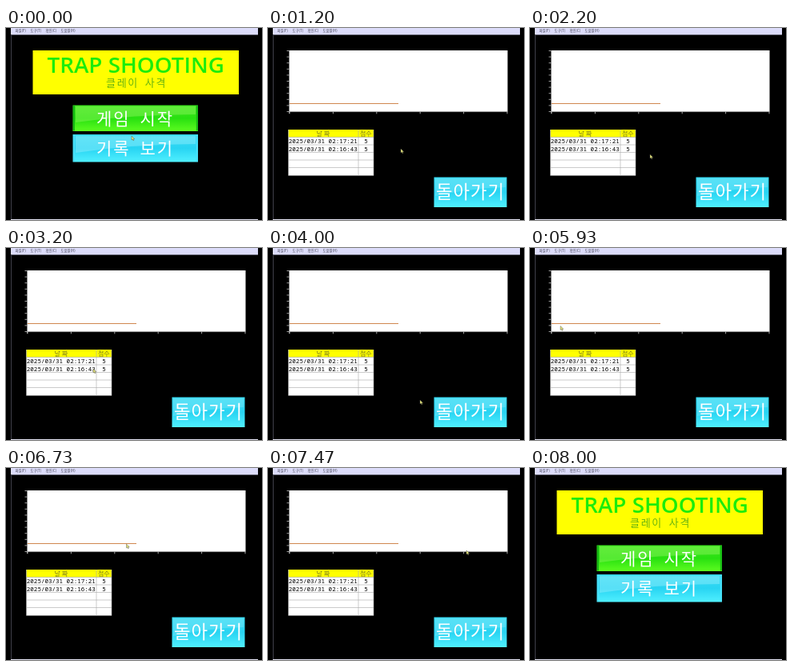
Animation, 320 px wide and 240 px high, one loop 8070 ms. Source, as an HTML page:

```html
<!DOCTYPE html>
<html lang="ko">
<head>
<meta charset="utf-8">
<title>Trap Shooting</title>
<style>
  html, body { margin: 0; width: 100%; height: 100%; overflow: hidden; background: #000; }
  svg { display: block; width: 100vw; height: 100vh; }
  text { font-family: "Noto Sans CJK KR", "Noto Sans CJK", sans-serif; }
  .bar { font-size: 4.4px; fill: #404050; }
  .title { font: 600 27.8px "Open Sans", sans-serif; fill: #1cec0c; }
  .sub { font-size: 13px; font-weight: 300; letter-spacing: 1.7px; word-spacing: 2.4px; fill: #68b410; }
  .label { font-size: 21px; font-weight: 300; letter-spacing: 1.9px; word-spacing: 4.2px; fill: #fff; }
  .back { font-size: 22.4px; font-weight: 300; letter-spacing: .9px; fill: #fff; }
  .head { font-size: 8px; font-weight: 300; fill: #78781c; }
  .cell { font: 7.55px "Noto Sans Mono", monospace; fill: #000; }
</style>
</head>
<body>
<svg viewBox="0 0 320 240" preserveAspectRatio="none">
  <defs>
    <linearGradient id="green" x2="0" y2="1">
      <stop offset="0" stop-color="#40e420"/>
      <stop offset=".5" stop-color="#28e010"/>
      <stop offset="1" stop-color="#5cfc20"/>
    </linearGradient>
    <linearGradient id="blue" x2="0" y2="1">
      <stop offset="0" stop-color="#3cdcf4"/>
      <stop offset=".5" stop-color="#28d4f2"/>
      <stop offset="1" stop-color="#50f0ff"/>
    </linearGradient>
  </defs>

  <rect width="320" height="240"/>
  <rect x="6" width="309" height="8.5" fill="#dcdcfa"/>
  <path d="M6.5 8V240" stroke="#50505e" stroke-width=".8"/>
  <path d="M6 239.5H315" stroke="#e4e4f4"/>
  <g class="bar">
    <text x="11.5" y="5.2">파일(F)</text>
    <text x="30.5" y="5.2">도구(T)</text>
    <text x="49.5" y="5.2">확인(C)</text>
    <text x="68.5" y="5.2">도움말(H)</text>
  </g>

  <g id="menu">
    <rect x="33.5" y="28" width="257.5" height="55" fill="#ffff00"/>
    <text class="title" x="51.5" y="56">TRAP SHOOTING</text>
    <text class="sub" x="125" y="73">클레이 사격</text>

    <rect x="83.5" y="96.5" width="156.5" height="32.5" fill="url(#green)"/>
    <path d="M87 98H237V108Q160 108 87 118Z" fill="#98f868" opacity=".4"/>
    <path d="M85 97V128.5M238.8 97V128.5" stroke="#14b814" stroke-width="2"/>
    <text class="label" x="113" y="120.5">게임 시작</text>

    <rect x="83.5" y="133" width="156.5" height="34.5" fill="url(#blue)"/>
    <path d="M87 135H237V145Q160 145 87 156Z" fill="#a0f0fc" opacity=".4"/>
    <path d="M85 133.5V167M238.8 133.5V167" stroke="#48e0f8" stroke-width="2"/>
    <text class="label" x="113" y="158">기록 보기</text>
  </g>

  <g id="records">
    <rect x="27" y="28" width="272.5" height="76.5" fill="#fff"/>
    <path d="M26.5 28V107" stroke="#999" stroke-width=".9"/>
    <path d="M27 104.6H299.5" stroke="#bbb" stroke-width=".7"/>
    <path id="ticks" stroke="#c8c8c8" stroke-width=".8"/>
    <path d="M27 94.5H163" stroke="#d08850" stroke-width="1"/>

    <rect x="25.5" y="127" width="106.5" height="57.5" fill="#fff"/>
    <rect x="25.5" y="127" width="106.5" height="9.5" fill="#ffff00"/>
    <path id="grid" stroke="#a8a8a8" stroke-width=".6"/>
    <text class="head" x="60.5" y="134.5">날 짜</text>
    <text class="head" x="115" y="134.5">점수</text>
    <text class="cell" x="25.8" y="144">2025/03/31 02:17:21</text>
    <text class="cell" x="120.2" y="144">5</text>
    <text class="cell" x="25.8" y="153.5">2025/03/31 02:16:43</text>
    <text class="cell" x="120.2" y="153.5">5</text>

    <rect x="207.5" y="186.5" width="91" height="37.5" fill="url(#blue)"/>
    <path d="M209 188H297V199Q255 200 209 210Z" fill="#90ecfa" opacity=".35"/>
    <text class="back" x="210" y="213.4">돌아가기</text>
  </g>

  <path id="cursor" d="M0 0V5L1.2 4L2 5.8L2.9 5.4L2.2 3.7H3.8Z" fill="#e4e478" stroke="#444" stroke-width=".4"/>
</svg>
<script>
  const LOOP = 8070, STEP = 200 / 3;
  const OPEN = 530, CLOSE = 7870;
  const $ = id => document.getElementById(id);

  // time, x, y of the pointer
  const path = [
    [0, 157, 135], [530, 157, 146], [1200, 166, 151], [2200, 150, 158],
    [3200, 109, 151], [4000, 190, 190], [4730, 256.5, 214],
    [5200, 180, 160], [5930, 38, 97.5], [6700, 150, 95],
    [7470, 248, 103], [7870, 252, 205]
  ];

  const range = n => [...Array(n).keys()];
  $("ticks").setAttribute("d",
    range(11).map(i => `M23.5 ${28.5 + i * 7.6}h3`).join("") +
    range(6).map(i => `M${27 + i * 54.4} 104.5v2.8`).join(""));
  $("grid").setAttribute("d",
    range(5).map(i => `M25.5 ${136.5 + i * 9.5}H132`).join("") +
    "M113 127V184.5M25.5 127V184.5M132 127V184.5");

  function pointerAt(t) {
    const i = path.findIndex(p => p[0] > t);
    if (i < 1) return path[path.length - 1].slice(1);
    const [t0, x0, y0] = path[i - 1], [t1, x1, y1] = path[i];
    const u = (t - t0) / (t1 - t0), k = u * u * (3 - 2 * u);
    return [x0 + (x1 - x0) * k, y0 + (y1 - y0) * k];
  }

  const show = (id, on) => $(id).style.display = on ? "" : "none";

  function draw() {
    const now = performance.now() % LOOP;
    const t = Math.floor(now / STEP + 0.1) * STEP;
    const records = t >= OPEN && t < CLOSE;
    show("menu", !records);
    show("records", records);
    show("cursor", t < CLOSE);
    const [x, y] = pointerAt(t);
    $("cursor").setAttribute("transform", `translate(${x.toFixed(1)} ${y.toFixed(1)})`);
    requestAnimationFrame(draw);
  }
  draw();
</script>
</body>
</html>
```
